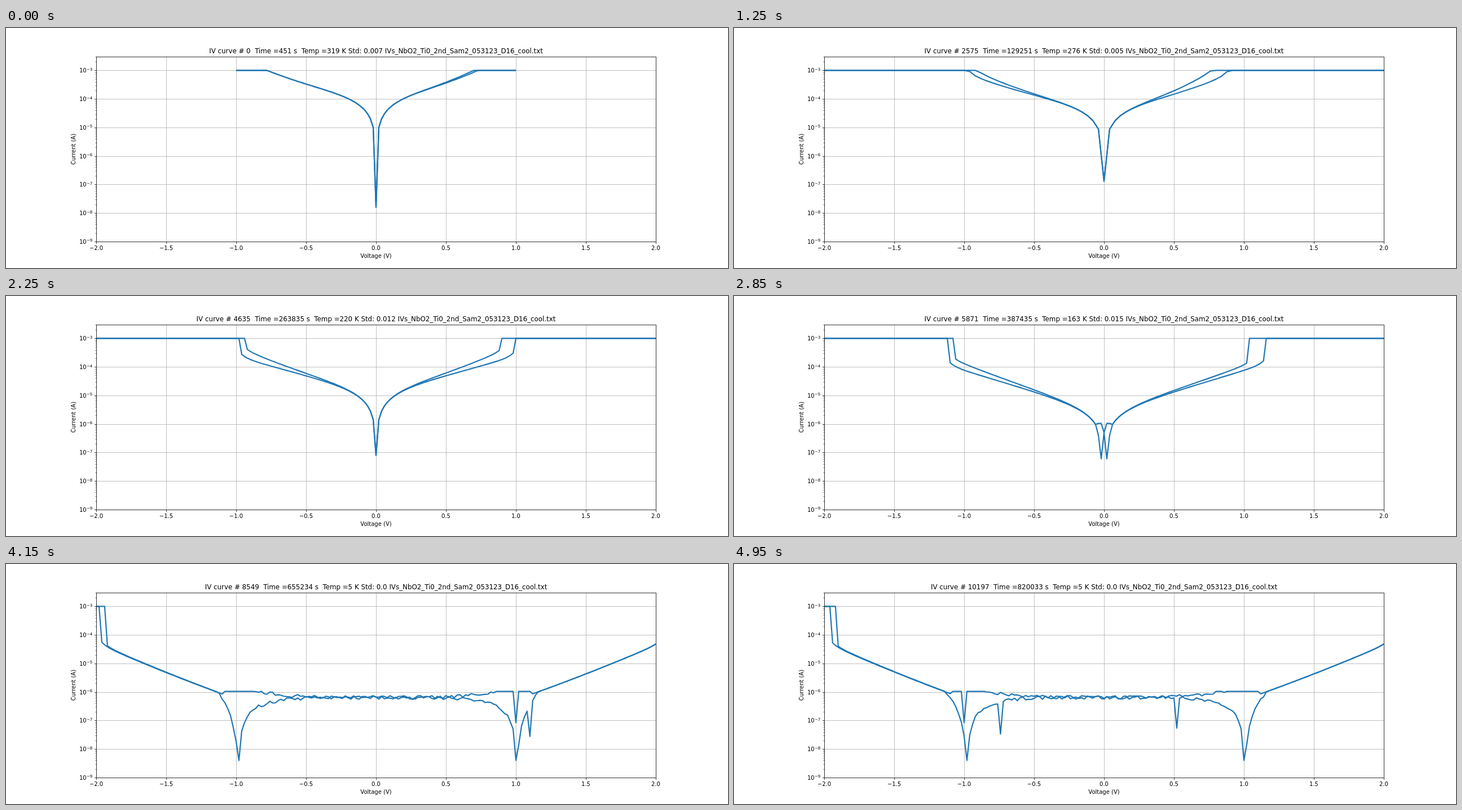
An HTML page with a canvas that plays this animation: 1280 by 427 pixels, repeating every 5000 ms.

```html
<!DOCTYPE html>
<html lang="en">
<head>
<meta charset="utf-8">
<title>IV curves while cooling</title>
<style>
html, body { margin: 0; height: 100%; overflow: hidden; background: #fff; }
canvas { display: block; }
</style>
</head>
<body>
<canvas id="stage" width="1280" height="427"></canvas>
<script>
const ctx = document.getElementById('stage').getContext('2d');
const L = 160, R = 1152, T = 51.24, B = 380.03, DECADE = 50.766;
const px = v => 656 + 248 * v;
const py = log => B - (log + 9) * DECADE;
const snap = x => Math.floor(x + 0.5) + 0.5;

// Key points of the cooling run; values between them are linear in time.
const tracks = {
  time: [451, 129251, 263835, 387435, 500735, 624335],
  temp: [319, 276, 220, 163, 85, 5],
  std: [.007, .005, .012, .015, .03, 0],
  base: [-3.3, -3.66, -4.15, -4.8, -6.43, -7.11],  // log of the conductance
  power: [2.7, 2.6, 1.95, 1.6, 1.15, 1.55],        // bend of the curve
  innerNeg: [.41, .72, .77, 1.02, 2.29, 2.43],     // rise up to the switch, in decades
  innerPos: [.48, .95, .8, .95, 2.08, 2.43],
  outer: [.41, .49, .47, .765, 1.9, 2.41],
  switchNeg: [.78, .94, .94, 1.08, 1.44, 1.945],   // volts
  switchPos: [.71, .84, .93, 1.08, 1.52, 1.98],
  offset: [.016, .13, .08, .5, .62, .65],          // zero error in uA
  dip: [1, 1, 1, .4, .67, .86]                     // place of the dip below 1 uA
};

const seconds = n => Math.round(n < 4004
  ? 451 + 50.0194 * n
  : 263835.3 + (n - 4635) * 99.99967);

function stateAt(time) {
  const t = tracks.time;
  let i = 0;
  while (i < 4 && time >= t[i + 1]) i++;
  const u = (time - t[i]) / (t[i + 1] - t[i]), f = Math.min(1, u);
  const s = { pose: i + u };
  for (const name in tracks) {
    const [a, b] = tracks[name].slice(i, i + 2);
    s[name] = a + (b - a) * f;
  }
  s.switchNeg -= 0.012 * Math.max(0, s.pose - 5);
  return s;
}

function rand(...seed) {
  const s = Math.sin(seed[0] * 12.9898 + seed[1] * 78.233 + seed[2] * 37.719) * 43758.5453;
  return s - Math.floor(s);
}

// One quarter of the loop: negative or positive side, inner or outer branch
function makeArm(s, neg, inner) {
  const mid = neg ? s.switchNeg : s.switchPos;
  const half = neg ? 0.02 : Math.min(0.06, 0.03 + 0.01 * s.pose);
  if (!neg && mid + half >= 2) inner = false; // never switches, so no hysteresis
  const limit = inner ? mid - half : mid + half;
  const rise = inner ? (neg ? s.innerNeg : s.innerPos) : s.outer;
  const kick = Math.min(1, s.pose) * (inner ? 0.06 : 0.12);
  const level = v => v > limit + 1e-6 ? -3 : Math.min(-3,
    s.base + Math.log10(v) + rise * (v / mid) ** s.power + kick * Math.exp((v - limit) / 0.04));
  let knee = 0.002; // voltage where the current reaches 1 uA
  while (level(knee) < -6) knee += 0.002;
  return { level, knee };
}

// Current in uA below the knee, with the meter's offset added or taken away
function lowCurrent({ level, knee }, v, adds, s, noise) {
  const dip = knee * s.dip, r = v / dip, e = 4 * dip + 0.5;
  if (adds) {
    return v === 0 || v < knee - Math.min(0.05, 0.02 + 0.08 * dip)
      ? Math.min(1.05, s.offset * (1 + 1.3 * r ** e) * noise)
      : 10 ** (level(v) + 6);
  }
  const i = r < 1 ? s.offset * (1 - r ** e) : ((v - dip) / (knee - dip)) ** (1 + 1.2 * dip);
  return Math.max(0.004, i * noise);
}

function drawSweep(k, dir, s) {
  const step = k >= 5 && k < 39 ? 0.04 : 0.02;
  const n = Math.round((k < 5 ? 1 : 2) / step);
  const negArm = makeArm(s, true, dir > 0), posArm = makeArm(s, false, dir < 0);
  const amp = 0.14 * Math.min(1, Math.max(0, s.pose - 3));
  ctx.beginPath();
  for (let i = -n; i <= n; i++) {
    const v = Math.abs(i) * step, arm = i < 0 ? negArm : posArm;
    let log = arm.level(v);
    if (v < arm.knee) {
      const noise = 1 + amp * (2 * rand(k, i, dir) - 1);
      log = Math.log10(lowCurrent(arm, v, (i >= 0) === (dir > 0), s, noise)) - 6;
      if (s.pose > 5 && rand(i, k, dir) < 0.005) log -= 1.1; // dropout
    }
    ctx.lineTo(px(i * step), py(log));
  }
  ctx.stroke();
}

function line(x1, y1, x2, y2) {
  ctx.beginPath();
  ctx.moveTo(x1, y1);
  ctx.lineTo(x2, y2);
  ctx.stroke();
}

function text(str, x, y, size = 10, align = 'center') {
  ctx.font = size + 'px "DejaVu Sans", sans-serif';
  ctx.textAlign = align;
  ctx.fillText(str, x, y);
}

function drawGrid() {
  ctx.strokeStyle = '#b0b0b0';
  ctx.lineWidth = 0.8;
  for (let v = -1.5; v < 2; v += 0.5) line(snap(px(v)), T, snap(px(v)), B);
  for (let e = -8; e <= -3; e++) line(L, snap(py(e)), R, snap(py(e)));
}

function drawAxes() {
  ctx.strokeStyle = ctx.fillStyle = '#000';
  ctx.lineWidth = 0.8;
  for (let v = -2; v <= 2; v += 0.5) {
    line(snap(px(v)), 380.5, snap(px(v)), 384);
    text(v.toFixed(1).replace('-', '\u2212'), px(v), 395);
  }
  for (let e = -9; e <= -3; e++) {
    const y = py(e);
    ctx.lineWidth = 0.8;
    line(157, snap(y), 160.5, snap(y));
    text('10', 142.7, Math.round(y + 4), 10, 'right');
    text('\u2212' + -e, 153.2, Math.round(y + 0.4), 7, 'right');
    ctx.lineWidth = 0.6;
    for (let m = 2; m <= (e === -3 ? 3 : 9); m++) {
      const my = snap(py(e + Math.log10(m)));
      line(158.5, my, 160.5, my);
    }
  }
  ctx.lineWidth = 0.8;
  ctx.strokeRect(snap(L), snap(T), R - L, snap(B) - snap(T));
  text('Voltage (V)', 656, 409);
  ctx.save();
  ctx.translate(123, 215.6);
  ctx.rotate(-Math.PI / 2);
  text('Current (A)', 0, 0);
  ctx.restore();
}

function draw(k) {
  const n = 103 * k, time = seconds(n), s = stateAt(time);
  ctx.fillStyle = '#fff';
  ctx.fillRect(0, 0, 1280, 427);
  drawGrid();
  ctx.save();
  ctx.beginPath();
  ctx.rect(L, T, R - L, B - T);
  ctx.clip();
  ctx.strokeStyle = '#1f77b4';
  ctx.lineWidth = 2.2;
  ctx.lineJoin = 'round';
  drawSweep(k, 1, s);
  drawSweep(k, -1, s);
  ctx.restore();
  drawAxes();
  text(`IV curve # ${n}  Time =${time} s  Temp =${Math.round(s.temp)} K ` +
    `Std: ${+s.std.toFixed(3) || '0.0'} IVs_NbO2_Ti0_2nd_Sam2_053123_D16_cool.txt`, 656, 45, 11.83);
}

let shown = -1;
function tick() {
  const k = Math.floor(performance.now() % 5000 / 50);
  if (k !== shown) draw(shown = k);
  requestAnimationFrame(tick);
}
tick();
</script>
</body>
</html>
```
